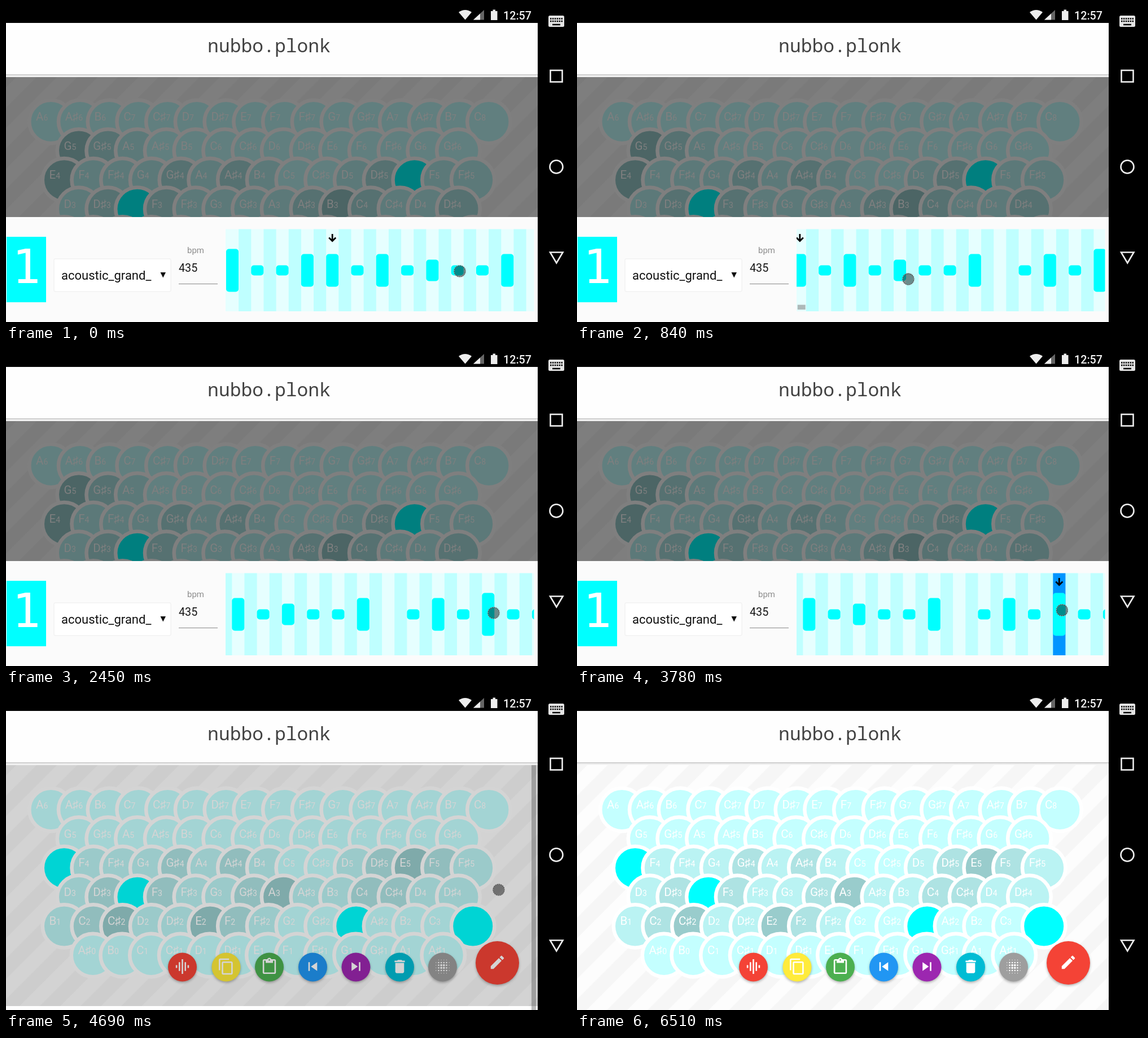
An HTML page for the animation above (6790 ms loop, 1001 by 560 pixels).

```html
<!DOCTYPE html>
<html lang="en">
<head>
<meta charset="utf-8">
<title>nubbo.plonk</title>
<style>
  html, body { margin: 0; width: 100%; height: 100%; overflow: hidden; background: #000; }
  svg { display: block; width: 1001px; height: 560px; font-family: Roboto, sans-serif; }
  .key text { font-size: 20.5px; fill: #fff; }
  .key .oct { font-size: 14px; }
  .key circle { stroke: #fff; stroke-width: 6.5; }
  .fab { filter: drop-shadow(0 2px 2px rgba(0, 0, 0, .3)); }
  .line { fill: none; stroke: #eee; stroke-width: 2.6; }
  .mono { font-family: 'Noto Sans Mono', monospace; }
  .slab { font-family: 'DejaVu Sans Mono', monospace; }
</style>
</head>
<body>
<svg viewBox="0 0 1001 560">
  <defs>
    <pattern id="diag" width="51" height="51" patternUnits="userSpaceOnUse" patternTransform="rotate(45)">
      <rect width="51" height="51" fill="#f6f6f6"/>
      <rect width="25.5" height="51" fill="#fdfdfd"/>
    </pattern>
    <linearGradient id="edge" x2="0" y2="1">
      <stop stop-color="#bdbdbd"/>
      <stop offset=".4" stop-color="#e6e6e6"/>
      <stop offset="1" stop-color="#f9f9f9"/>
    </linearGradient>
    <clipPath id="view"><rect x="389" y="395.5" width="546.5" height="145.5"/></clipPath>
  </defs>

  <rect y="121" width="942" height="439" fill="url(#diag)"/>
  <g id="before"></g>
  <g id="after"></g>
  <g id="fabs"></g>
  <rect id="pageBar" x="931" y="126" width="8" height="434" fill="#5a5a5a" fill-opacity=".38"/>
  <rect id="dim" y="126" width="942" height="427"/>
  <rect id="foot" y="553" width="931" height="7" fill="#fdfdfd"/>

  <g id="panel">
    <rect y="374" width="942" height="186" fill="#fbfbfb"/>
    <rect x="1" y="409" width="70" height="116" fill="#0ff"/>
    <text class="slab" x="36" y="490.5" text-anchor="middle" font-size="84" fill="#fff">1</text>
    <rect x="85" y="448" width="207" height="58" rx="2" fill="#fff" stroke="#ececec"/>
    <text x="98" y="485" font-size="22" fill="#111">acoustic_grand_</text>
    <path d="M273.5 472h9.5l-4.750 9.5z" fill="#111"/>
    <text x="321" y="438" font-size="15" fill="#8d8d8d">bpm</text>
    <text x="306" y="471" font-size="19.7" fill="#161616">435</text>
    <rect x="306" y="492" width="69" height="1" fill="#888"/>
    <g clip-path="url(#view)">
      <rect x="389" y="395" width="547" height="146" fill="#e6ffff"/>
      <g id="strip"></g>
      <rect id="thumb" y="529.5" width="14" height="8.5" fill="#808080" fill-opacity=".55"/>
    </g>
  </g>

  <rect width="942" height="30"/>
  <rect y="30" width="942" height="91" fill="#fefefe"/>
  <rect y="121" width="942" height="5" fill="url(#edge)"/>
  <text class="mono" x="466" y="82" text-anchor="middle" font-size="33" font-weight="300" fill="#424242">nubbo.plonk</text>

  <path d="M802 11Q813.5 3 825 11L813.5 24.5z" fill="#eee"/>
  <path d="M847 7V24.5H828z" fill="#666"/>
  <path d="M840 13.5V24.5H828z" fill="#eee"/>
  <path d="M859 9h3.5v-2.5h4.5v2.5h3.5v16h-11.5z" fill="#eee"/>
  <text x="881" y="23.5" font-size="19.7" font-weight="500" fill="#f4f4f4">12:57</text>

  <rect x="942" width="59" height="560"/>
  <rect x="961" y="17" width="28" height="20" rx="2.5" fill="#e4e4e4"/>
  <path d="M964 22.5h22M964 27h22" stroke="#000" stroke-width="2.5" stroke-dasharray="2.5 1.4"/>
  <path d="M968 33h14" stroke="#000" stroke-width="2.5"/>
  <rect class="line" x="964.5" y="114" width="21" height="20.5"/>
  <circle class="line" cx="975" cy="285" r="11.5"/>
  <path class="line" d="M964 436.5h22.5l-11.25 19z"/>

  <g id="pointer">
    <circle r="10" fill-opacity=".45"/>
    <circle r="10" fill="none" stroke="#444" stroke-width="1.2"/>
    <circle r="10" fill="none" stroke="#ddd" stroke-dasharray="1.5 2"/>
  </g>
</svg>
<script>
const LOOP = 6790, STEP = 70, CELL = 22.15, SCROLL = 255.5;
const $ = id => document.getElementById(id);
const NS = 'http://www.w3.org/2000/svg';

function add(parent, tag, attrs = {}, text) {
  const el = document.createElementNS(NS, tag);
  for (const k in attrs) el.setAttribute(k, attrs[k]);
  if (text) el.textContent = text;
  return parent.appendChild(el);
}

// Keyboard rows: lowest pitch in semitones from C0, first centre, key count.
const NAMES = 'C C♯ D D♯ E F F♯ G G♯ A A♯ B'.split(' ');
const ROWS = [[81, 79.5, 16], [67, 129, 14], [52, 103, 15], [38, 129, 14], [23, 103, 15], [10, 154, 13]];
const TONES = { 0: '#c4ffff', 1: '#baf3f3', 2: '#aee3e3', 3: '#99cccc', L: '#00ffff' };

function keyboard(parent, shades) {
  ROWS.forEach(([pitch, x0, count], row) => {
    for (let i = 0; i < count; i++) {
      const tone = (shades[row] || '')[i] || '0';
      const note = pitch + i;
      const x = x0 + i * 51.73, y = 205 + row * 51.6;
      const key = add(parent, 'g', { class: 'key' });
      add(key, 'circle', { cx: x, cy: y, r: 38.25, fill: TONES[tone] });
      if (tone === 'L') continue;
      const label = add(key, 'text', { x: x - 26.5, y: y - 2 });
      add(label, 'tspan', {}, NAMES[note % 12]);
      add(label, 'tspan', { class: 'oct' }, String(Math.floor(note / 12)));
    }
  });
}
keyboard($('before'), ['', '321', '311121210012L11', '12L21111232112']);
keyboard($('after'), ['', '', 'L11121210012321', '12L21123112211', '1231132100L000L']);

// Floating buttons
function dots() {
  let d = '';
  for (let i = 0; i < 6; i++) for (let j = 0; j < 6; j++) {
    const a = Math.abs(i - 2.5), b = Math.abs(j - 2.5);
    if (a + b > 4) continue;
    const r = Math.max(a, b) > 2 ? .5 : Math.max(a, b) < 1 ? 1.4 : 1;
    d += `M${3 + i * 3.6 - r} ${3 + j * 3.6}a${r} ${r} 0 1 0 ${2 * r} 0a${r} ${r} 0 1 0 ${-2 * r} 0z`;
  }
  return d;
}
const ICONS = {
  wave: 'M7 18h2V6H7v12zm4 4h2V2h-2v20zm-8-8h2v-4H3v4zm12 4h2V6h-2v12zm4-8v4h2v-4h-2z',
  copy: 'M16 1H4c-1.1 0-2 .9-2 2v14h2V3h12V1zm3 4H8c-1.1 0-2 .9-2 2v14c0 1.1.9 2 2 2h11c1.1 0 2-.9 2-2V7c0-1.1-.9-2-2-2zm0 16H8V7h11v14z',
  paste: 'M19 2h-4.18C14.4.84 13.3 0 12 0c-1.3 0-2.4.84-2.82 2H5c-1.1 0-2 .9-2 2v16c0 1.1.9 2 2 2h14c1.1 0 2-.9 2-2V4c0-1.1-.9-2-2-2zm-7 0c.55 0 1 .45 1 1s-.45 1-1 1-1-.45-1-1 .45-1 1-1zm7 18H5V4h2v3h10V4h2v16z',
  prev: 'M6 6h2v12H6zm3.5 6l8.5 6V6z',
  next: 'M6 18l8.5-6L6 6v12zM16 6v12h2V6h-2z',
  bin: 'M6 19c0 1.1.9 2 2 2h8c1.1 0 2-.9 2-2V7H6v12zM19 4h-3.5l-1-1h-5l-1 1H5v2h14V4z',
  blur: dots(),
  edit: 'M3 17.25V21h3.75L17.81 9.94l-3.75-3.75L3 17.25zM20.71 7.04c.39-.39.39-1.02 0-1.41l-2.34-2.34c-.39-.39-1.02-.39-1.41 0l-1.83 1.83 3.75 3.75 1.83-1.83z'
};
function fab(icon, fill, x, y = 484, r = 25.5) {
  const g = add($('fabs'), 'g', { transform: `translate(${x} ${y})` });
  add(g, 'circle', { class: 'fab', r, fill });
  add(g, 'path', { d: ICONS[icon], fill: '#fff', transform: 'translate(0 -1) scale(1.3) translate(-12 -12)' });
}
fab('wave', '#f44336', 312.5);
fab('copy', '#ffeb3b', 390);
fab('paste', '#4caf50', 466.5);
fab('prev', '#2196f3', 543.5);
fab('next', '#9c27b0', 620);
fab('bin', '#00bcd4', 697.5);
fab('blur', '#9e9e9e', 773.5);
fab('edit', '#f44336', 870.5, 476.5, 38.5);

// Sequencer strip
const HEIGHTS = { T: 76, M: 58, m: 38, s: 18 };
const strip = $('strip');
const cellX = i => 390 + i * 2 * CELL;
for (let i = 0; i < 20; i++)
  add(strip, 'rect', { x: cellX(i) + CELL, y: 395, width: CELL, height: 146, fill: '#bfffff' });
const hot = add(strip, 'rect', { x: cellX(16), y: 395, width: CELL, height: 146, fill: '#0095ff' });
[...'TssMMsMsmssM-sMsTss'].forEach((c, i) => {
  const h = HEIGHTS[c];
  if (h) add(strip, 'rect', { x: cellX(i), y: 468.5 - h / 2, width: 22, height: h, rx: 5, fill: '#0ff' });
});
const arrow = add(strip, 'path', {
  d: 'M0 404v12M-6 410.5l6 6 6-6', fill: 'none', stroke: '#000', 'stroke-width': 2.8
});

// Motion
const clamp = v => Math.min(1, Math.max(0, v));
const span = (t, a, b) => clamp((t - a) / (b - a));
const ease = p => .5 - .5 * Math.cos(Math.PI * p);
const mix = (a, b, p) => a + (b - a) * p;
const drag = t => ease(span(t, 350, 1050) ** .89);

function pointerAt(t) {
  if (t < 1330) return [mix(804, 542, drag(t)), mix(470, 487, drag(t))];
  if (t < 3710) {
    const p = ease(span(t, 1260, 2450));
    return [mix(542, 864, p), mix(487, 466, p)];
  }
  const p = ease(span(t, 3700, 4270)), q = 1 - p;
  const x = q * q * 864 + 2 * p * q * 814 + p * p * 873;
  return [x, mix(467, t < 4480 ? 345.5 : 347, p)];
}

const show = (el, on) => { el.style.display = on ? '' : 'none'; };

function draw(t) {
  const closed = t >= 4620, picked = t >= 3150;
  const scroll = Math.min(SCROLL, 260 * drag(t - STEP));
  strip.setAttribute('transform', `translate(${-scroll} 0)`);
  arrow.setAttribute('transform', `translate(${cellX(picked ? 16 : 4) + 11} 0)`);
  show(hot, picked);
  $('thumb').setAttribute('x', 389 + 2.4 * scroll / SCROLL);
  $('thumb').style.opacity = t < 420 ? 0 : 1 - span(t, 1750, 2100);

  show($('panel'), !closed);
  show($('before'), !closed);
  show($('after'), closed);
  show($('fabs'), closed);
  $('dim').style.opacity = closed ? .5 * (1 - span(t, 4550, 4760)) : .5;
  show($('foot'), closed && t < 4760);
  $('pageBar').style.opacity = closed ? 1 - span(t, 5110, 5460) : 0;

  const [x, y] = pointerAt(t);
  $('pointer').setAttribute('transform', `translate(${x} ${y})`);
  show($('pointer'), t < 6510);
}

const start = performance.now();
function tick() {
  const t = (performance.now() - start) % LOOP;
  draw(Math.floor(t / STEP) * STEP);
  requestAnimationFrame(tick);
}
draw(0);
requestAnimationFrame(tick);
</script>
</body>
</html>
```
